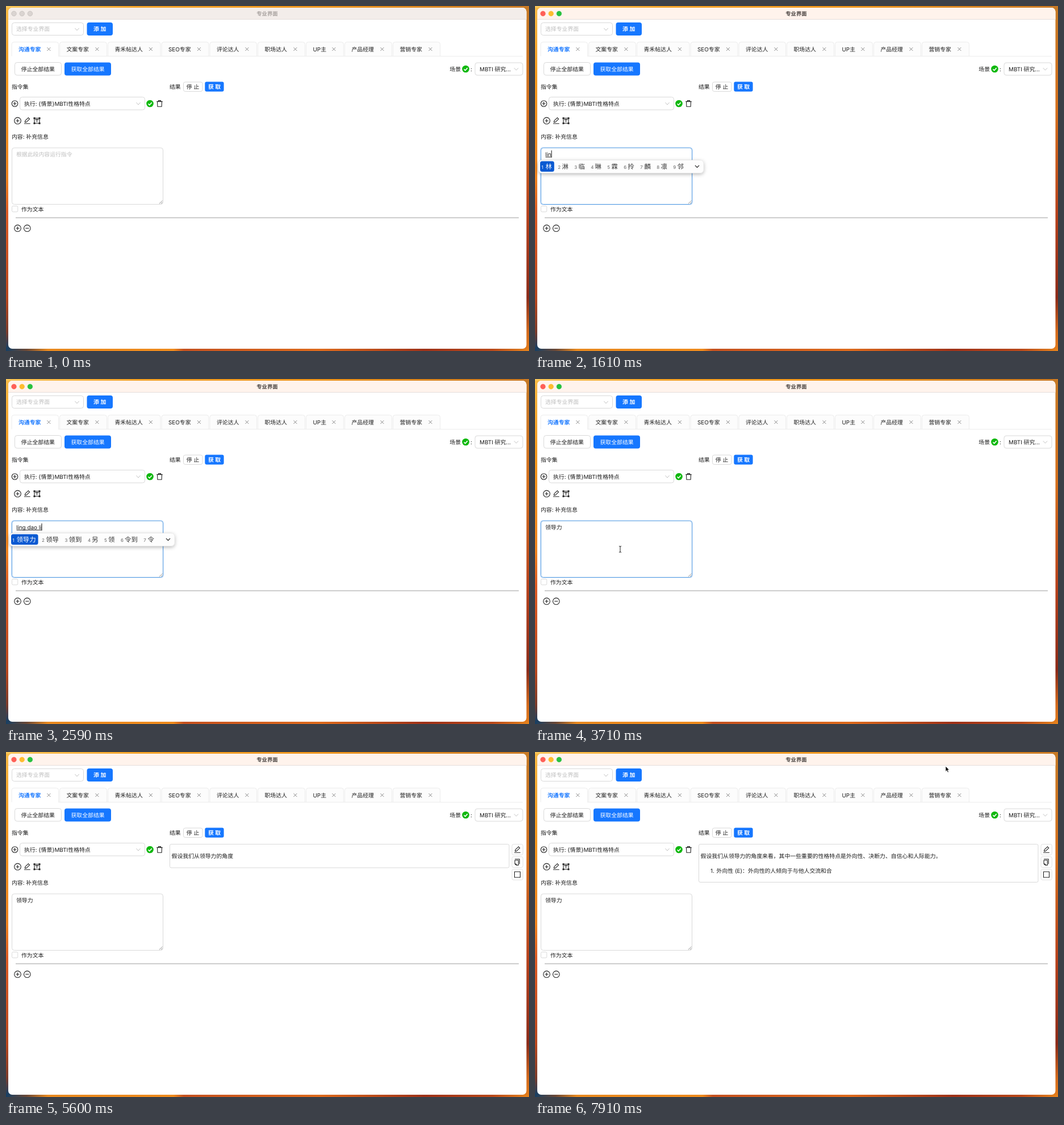
Write an HTML page that moves like this. It is 921 px wide and 608 px high and loops after 8000 ms.

```html
<!DOCTYPE html>
<html lang="zh-CN">
<head>
<meta charset="utf-8">
<title>专业界面</title>
<style>
html, body { margin: 0; width: 100%; height: 100%; overflow: hidden; background: #e8892a; }
svg { display: block; width: 921px; height: 608px; }
text {
  font: 9.87px Inter, "Noto Sans CJK SC", "Noto Sans CJK", sans-serif;
  fill: #1c1c1c; white-space: pre; text-rendering: geometricPrecision;
}
.hint { fill: #bfbfbf; }
.on { fill: #fff; font-weight: 500; }
.box { fill: #fff; stroke: #d9d9d9; }
.icon { fill: none; stroke: #222; stroke-width: 1.1; stroke-linejoin: round; }
.chev { fill: none; stroke: #c4c4c4; stroke-width: 1; }
.x { fill: none; stroke: #858585; stroke-width: .95; }
</style>
</head>
<body>
<svg id="stage" viewBox="0 0 921 608"></svg>
<script>
const LOOP = 8000, STEP = 70, EM = 9.87;
const BLUE = '#1677ff';
const stage = document.getElementById('stage');

// Static drawing helpers; text is placed by its vertical centre.
const text = (x, cy, s, attr = '') => `<text x="${x}" y="${cy + 3.6}" ${attr}>${s}</text>`;
const mid = (x, cy, s, attr = '') => text(x, cy, s, 'text-anchor="middle" ' + attr);
const rect = (l, t, r, b, rx, attr = 'class="box"') =>
  `<rect x="${l}" y="${t}" width="${r - l}" height="${b - t}" rx="${rx}" ${attr}/>`;
const icon = (x, y, d, cls = 'icon') => `<path class="${cls}" transform="translate(${x} ${y})" d="${d}"/>`;
const chevron = (x, y) => icon(x, y, 'M-3.6-2L0 2L3.6-2', 'chev');
const ring = (x, y, r, plus) =>
  `<circle class="icon" cx="${x}" cy="${y}" r="${r}"/>` + icon(x, y, 'M-3 0H3' + (plus ? 'M0-3V3' : ''));
const check = (x, y) => `<circle cx="${x}" cy="${y}" r="6.3" fill="#10b80f"/>` +
  `<path d="M${x - 3} ${y + .2}l2.2 2.3l4-4.4" fill="none" stroke="#fff" stroke-width="1.6"/>`;
const gradient = (id, dir, stops) => `<linearGradient id="${id}" ${dir}>` +
  stops.map(([o, c]) => `<stop offset="${o}" stop-color="${c}"/>`).join('') + '</linearGradient>';
const pencil = 'M-5.4 5.3H5.4M-4 2.9L-3.4.2L2-5.2L4.3-2.9L-1.1 2.4Z';

function wallpaper() {
  const down = 'x1="0" y1="0" x2="0" y2="1"';
  return '<defs>' +
    gradient('gl', down, [[0, '#f6b945'], [.2, '#f39a1e'], [.5, '#ee8420'], [.6, '#dc5b26'], [.85, '#b9481f'], [.95, '#7b3c2c'], [1, '#173f63']]) +
    gradient('gr', down, [[0, '#c77a25'], [.3, '#d5701c'], [.6, '#b8421c'], [.85, '#8c2a18'], [.95, '#d46a1b'], [1, '#e17a1c']]) +
    gradient('gt', '', [[0, '#f8c65a'], [.25, '#f3a32a'], [.6, '#ee961f'], [1, '#c97a26']]) +
    gradient('gb', '', [[0, '#173f63'], [.04, '#6b4836'], [.08, '#e8891f'], [.32, '#ee8a1c'], [.34, '#c4501f'], [.6, '#dd6a1c'], [.8, '#9e3118'], [.93, '#b8481a'], [1, '#e6841c']]) +
    '<filter id="shade" x="-10%" y="-40%" width="120%" height="200%"><feDropShadow dx="0" dy="2" stdDeviation="3" flood-opacity=".28"/></filter></defs>' +
    rect(0, 0, 921, 8, 0, 'fill="url(#gt)"') + rect(0, 600, 921, 608, 0, 'fill="url(#gb)"') +
    rect(0, 3, 10, 604, 0, 'fill="url(#gl)"') + rect(910, 3, 921, 604, 0, 'fill="url(#gr)"');
}

function frame() {
  const lights = [14, 28.2, 42.4].map(x => `<circle class="light" cx="${x}" cy="13.4" r="4.3" stroke-width=".6"/>`).join('');
  return rect(4, 3, 916.5, 604, 7, 'fill="#fff"') +
    '<path id="bar" d="M4 23.5V10a7 7 0 0 1 7-7H909.5a7 7 0 0 1 7 7V23.5Z"/>' +
    '<path d="M4 23.5H916.5" stroke="#e4dcd8" stroke-width=".9"/>' + lights +
    mid(460, 13, '专业界面', 'id="title" style="font-size:9.4px;font-weight:600"');
}

function tabs() {
  const list = [['沟通专家', 10, 93], ['文案专家', 94.5, 178], ['青禾帖达人', 179.5, 272.5], ['SEO专家', 274, 357.5],
    ['评论达人', 359, 442], ['职场达人', 443.5, 527], ['UP主', 528.5, 595], ['产品经理', 596.5, 680], ['营销专家', 681.5, 765]];
  return '<path d="M10 88.5H910" stroke="#ececec"/>' + list.map(([name, l, r], i) =>
    `<path d="M${l} 88.5V67.5q0-4 4-4H${r - 4.5}q4 0 4 4V88.5" fill="${i ? '#fcfcfc' : '#fff'}" stroke="#ececec"/>` +
    (i ? `<path d="M${l} 88.5H${r}" stroke="#ececec"/>` : `<path d="M${l + .5} 88.5H${r - 1}" stroke="#fff"/>`) +
    text(l + 12, 76, name, i ? '' : `style="fill:${BLUE};font-weight:600"`) +
    icon(r - 17.6, 76, 'M-3-3L3 3M3-3L-3 3', 'x')).join('');
}

function controls() {
  const corners = [[-4.5, -4.5], [4.5, -4.5], [-4.5, 4.5], [4.5, 4.5]].map(([x, y]) => `M${x - 1} ${y - 1}h2v2h-2z`).join('');
  const blue = `fill="${BLUE}"`;
  return rect(10.5, 29.5, 136.5, 51.5, 4) + text(18, 40.8, '选择专业界面', 'class="hint"') + chevron(125, 41) +
    rect(142.5, 29, 188, 52, 4, blue) + mid(165.2, 40.8, '添 加', 'class="on" style="font-weight:600"') +
    rect(15.5, 99.5, 97.5, 122, 4) + text(26.8, 111.2, '停止全部结果') +
    rect(103, 99.5, 185, 122.5, 4, blue) + text(114.5, 111.2, '获取全部结果', 'class="on"') +
    text(781.3, 111.2, '场景') + check(809.5, 111) + text(818, 111, ':') +
    rect(826, 100, 910, 122, 4) + text(834, 111.2, 'MBTI 研究...') + chevron(898.5, 111.2) +
    text(10, 142, '指令集') + text(288, 142.3, '结果') +
    rect(312.5, 134, 346, 150.5, 3) + mid(329, 142.3, '停 止') +
    rect(350.3, 133.5, 383.6, 150.8, 3, 'id="get"') + mid(367, 142.3, '获 取', 'class="on" style="font-weight:600"') +
    ring(15.5, 172, 5.3, true) + rect(24.5, 160.5, 244.5, 183, 4) + text(32, 172, '执行: {情景}MBTI性格特点') +
    chevron(233, 172) + check(253.5, 172) +
    icon(270.5, 172, 'M-5.2-3.6H5.2M-2-3.6V-5.4H2V-3.6M-4-3.6L-3.6 5.2H3.6L4-3.6') +
    ring(20.5, 202.2, 5.8, true) + icon(37.3, 202, pencil) +
    icon(54.5, 202.2, 'M-4.5-4.5H4.5V4.5H-4.5Z' + corners + 'M-2.2-1.2V-2.3H2.2V-1.2M0-2.3V2.6') +
    text(10, 230.6, '内容: 补充信息') +
    rect(8.8, 248.8, 277.8, 351, 5, 'id="glow" fill="#d6e8ff"') + rect(10.5, 250, 276.5, 349.5, 4, 'id="area" fill="#fff"') +
    '<path d="M270 348.3L275.5 343M273 348.3L275.5 346" stroke="#777" stroke-width=".8"/>' +
    text(18, 261, '', 'id="entry"') + '<path id="under" stroke="#222" stroke-width="1"/><path id="caret" stroke="#111" stroke-width="1"/>' +
    rect(10.5, 352.5, 20.8, 362.8, 2) + text(27, 358, '作为文本') +
    '<path d="M17 373.2H903" stroke="#bdbdbd" stroke-width="1.5"/>' +
    ring(20.5, 391.7, 5.8, true) + ring(37.3, 391.7, 5.8, false);
}

function result() {
  const icons = [pencil, 'M-4.4-5.2H3.8V3.4M-4.4-3.2H1.8V5.4H-2L-4.4 3.2ZM-4.4 3.2H-2V5.4', 'M-5-5H5V5H-5Z'];
  return '<g id="result"><rect id="panel" class="box" x="288.5" y="162.5" width="597.5" rx="2.5"/>' +
    icons.map((d, i) => rect(891, 162.5 + i * 22, 910.3, 181.5 + i * 22, 3, 'fill="#fff" stroke="#e2e2e2"') + icon(900.5, 172 + i * 22, d)).join('') +
    text(291.6, 183.4, '', 'id="line1"') + text(291.6, 209, '', 'id="mark"') + text(319.6, 209, '', 'id="line2"') + '</g>';
}

const overlays = '<g id="ime"></g><g id="mouse" stroke-linejoin="round">' +
  '<path id="arrow" d="M0 0V9.4L2.2 7.4L3.8 11L5.4 10.3L3.8 6.8H6.6Z" fill="#000" stroke="#fff" stroke-width=".7"/>' +
  '<path id="beam" d="M-2-5.5Q0-5.5 0-4V4Q0 5.5-2 5.5M2-5.5Q0-5.5 0-4M0 4Q0 5.5 2 5.5" fill="none" stroke="#222"/>' +
  '<path id="hand" d="M-1.2 0Q0-1.6 1 0V3.6Q2.4 3 2.8 4.2Q4.2 3.6 4.6 5Q6 4.8 6.1 6.2V8.2L5 11.4H-.2L-3.2 7.4Q-3.6 6-1.2 7Z" fill="#fff" stroke="#111" stroke-width=".9"/></g>';

stage.innerHTML = wallpaper() + frame() + tabs() + controls() + result() + overlays;
const el = Object.fromEntries([...stage.querySelectorAll('[id]')].map(n => [n.id, n]));
const lights = stage.querySelectorAll('.light');

// Timeline: [start ms, value...]
const ACTIVE = 1190, COMMIT = 2730, BLUR = 4200, ANSWER = 5250;
const typing = [
  [1470, 'l', '了 来 老 里 力 两 拉 另 啦'], [1540, 'li', '里 力 李 离 理 利 丽 例 立'],
  [1610, 'lin', '林 淋 临 琳 霖 拎 麟 凛 邻'], [2030, 'ling', '领 另 零 灵 令 铃 凌 玲 岭'],
  [2100, 'ling d', '领导 领到 灵动 另 领 令 零'], [2240, 'ling da', '领导 领带 另 领 零 令 灵'],
  [2380, 'ling dao', '领导 领到 令到 另 领 零 令'], [2520, 'ling dao l', '领导力 领导 领到 另 领 令到 令'],
  [2590, 'ling dao li', '领导力 领导 领到 另 领 令到 令']];
const first = '假设我们从领导力的角度来看，其中一些重要的性格特点是外向性、决断力、自信心和人际能力。';
const second = '外向性 (E)：外向性的人倾向于与他人交流和合';
const firstLen = [[5320, 2], [5460, 5], [5530, 8], [5600, 11], [5670, 13], [5810, 16], [5950, 20], [6090, 24], [6230, 28],
  [6300, 30], [6440, 31], [6580, 34], [6650, 39], [6790, 41], [6860, 43]];
const moves = [
  [[770, 470, 596], [1120, 150, 300], [1470, 150, 300]],
  [[3710, 150, 300], [4130, 363.6, 145.8], [4340, 363.6, 145.8], [4480, 455, 10]],
  [[5810, 570, 120], [6090, 723, 25], [LOOP, 723, 25]]];

const last = (rows, t) => rows.filter(r => r[0] <= t).pop();
const clamp = v => Math.min(1, Math.max(0, v));
const ramp = (t, a, b) => clamp((t - a) / (b - a));
const show = (node, on) => node.setAttribute('visibility', on ? 'inherit' : 'hidden');
const set = (node, attrs) => { for (const k in attrs) node.setAttribute(k, attrs[k]); };

function drawIme(words) {
  let x = 11.3, out = rect(6, 271.5, 297, 294.5, 6, 'fill="#fdfdfd" stroke="#d6d6d6" stroke-width=".5" filter="url(#shade)"');
  words.split(' ').forEach((w, i) => {
    const ink = i ? '#333' : '#fff';
    if (!i) out += rect(9, 273.5, 22.4 + 11.4 * w.length, 292, 3.5, 'fill="#0a5ad2"');
    out += text(x, 283, i + 1, `style="font-size:8px;fill:${i ? '#666' : '#fff'}"`) +
      text(x + 7.1, 283.1, w, `style="font-size:11.4px;fill:${ink}"`);
    x += 17.6 + 11.4 * w.length;
  });
  el.ime.innerHTML = out + icon(285.5, 282.7, 'M-3.6-1.8L0 1.8L3.6-1.8');
}

function drawEntry(t) {
  const composing = t >= typing[0][0] && t < COMMIT;
  const focus = t >= ACTIVE && t < BLUR;
  const row = composing && last(typing, t);
  const value = row ? row[1] : t >= COMMIT ? '领导力' : '';
  el.entry.textContent = value || '根据此段内容运行指令';
  el.entry.setAttribute('class', value ? '' : 'hint');
  const end = 18 + (value ? el.entry.getComputedTextLength() : 0) + .5;
  set(el.under, { d: `M18.5 266.2H${end}` });
  set(el.caret, { d: `M${end} 254.5V267` });
  show(el.under, composing);
  show(el.caret, focus && t < 3290);
  show(el.glow, focus);
  set(el.area, { stroke: focus ? '#5b9fdf' : '#d9d9d9' });
  show(el.ime, composing);
  if (row) drawIme(row[2]);
}

function drawWindow(t) {
  const on = t >= ACTIVE;
  set(el.bar, { fill: on ? '#fff3ec' : '#f3edea' });
  el.title.style.fill = on ? '#4a4441' : '#a9a3a0';
  ['#ff5f57', '#febc2e', '#28c13f'].forEach((c, i) =>
    set(lights[i], { fill: on ? c : '#dad4d1', stroke: on ? c : '#bdb7b4' }));
  const hover = ramp(t, 3990, 4130) * (1 - ramp(t, 4480, 4760));
  const mix = (a, b) => Math.round(a + (b - a) * hover);
  set(el.get, { fill: `rgb(${mix(22, 64)},${mix(119, 150)},255)` });
}

function drawResult(t) {
  show(el.result, t >= ANSWER);
  set(el.panel, { height: t >= 6930 ? 67 : 41.5 });
  const row = last(firstLen, t);
  el.line1.textContent = first.slice(0, row ? row[1] : 0);
  const listed = t >= 7350;
  el.mark.textContent = listed ? '1.' : t >= 6930 ? '1' : '';
  set(el.mark, { x: listed ? 309 : 291.6 });
  const n = t >= 7560 ? 8 + 3 * Math.floor((t - 7560) / STEP) : listed ? 6 : 0;
  el.line2.textContent = second.slice(0, n);
}

function drawMouse(t) {
  const path = moves.find(p => t >= p[0][0] && t < p[p.length - 1][0]);
  show(el.mouse, path);
  if (!path) return;
  const i = path.findIndex(p => p[0] > t);
  const [a, b] = [path[i - 1], path[i]];
  const k = ramp(t, a[0], b[0]), e = k * k * (3 - 2 * k);
  const x = a[1] + (b[1] - a[1]) * e, y = a[2] + (b[2] - a[2]) * e;
  const inside = (l, top, r, bottom) => x > l && x < r && y > top && y < bottom;
  const kind = inside(10, 250, 277, 350) ? 'beam' : inside(350, 133, 384, 151) ? 'hand' : 'arrow';
  ['arrow', 'beam', 'hand'].forEach(name => show(el[name], path && name === kind));
  set(el.mouse, { transform: `translate(${x} ${y})` });
  ['arrow', 'beam', 'hand'].forEach(name => set(el[name], { display: name === kind ? 'inline' : 'none' }));
}

let start, shown = -1;
function tick(now) {
  start ??= now;
  const t = Math.floor(((now - start) % LOOP) / STEP) * STEP;
  if (t !== shown) {
    shown = t;
    drawWindow(t);
    drawEntry(t);
    drawResult(t);
    drawMouse(t);
  }
  requestAnimationFrame(tick);
}
requestAnimationFrame(tick);
</script>
</body>
</html>
```
